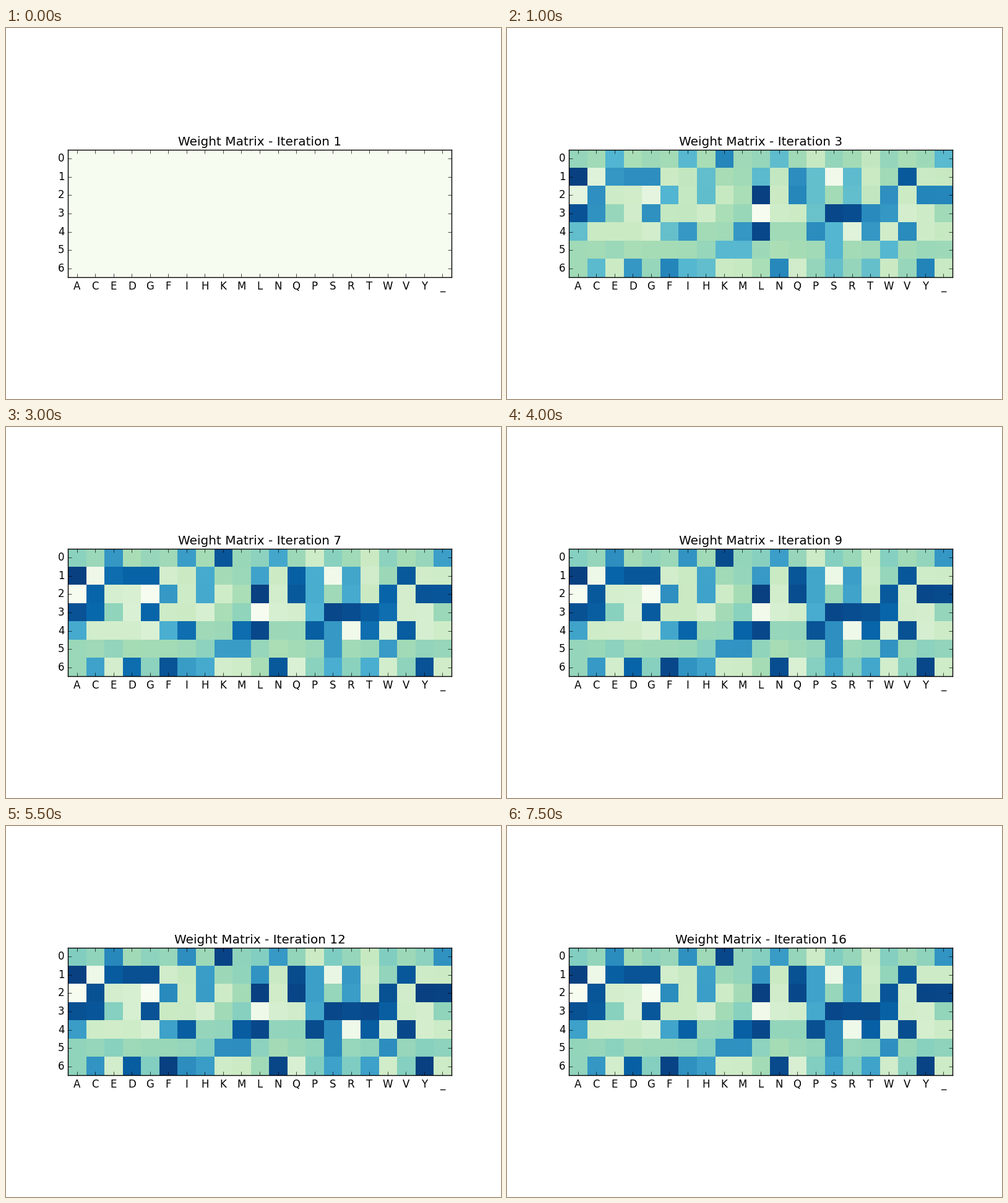
A matplotlib script for the animation above (8 s loop, 800 by 600 pixels).

```python
import numpy as np
import matplotlib.pyplot as plt
from matplotlib.animation import FuncAnimation

plt.style.use("classic")
plt.rcParams["font.family"] = "DejaVu Sans"

LETTERS = "ACEDGFIHKMLNQPSRTWVY_"
ITERATIONS = 16
SETTLE = 13    # iteration at which the weights stop drifting
RATE = 3.7     # time constant of the learning curve

# Letters that stand out at each position; all others stay near NEUTRAL.
NEUTRAL = 0.42
LEVELS = {"strong": 0.91, "raised": 0.68, "faint": 0.21, "lost": 0.03}
PROFILE = [
    dict(strong="K", raised="EIN_", faint="PT"),
    dict(strong="AEDGQV", raised="HLPR", faint="FINTY_", lost="CS"),
    dict(strong="CLQWY_", raised="FHPR", faint="EDIKNTV", lost="AG"),
    dict(strong="ACGSRTW", raised="P", faint="DFIHNQVY", lost="L"),
    dict(strong="IMLPTV", raised="AFS", faint="CEDGWY_", lost="R"),
    dict(raised="KMSW"),
    dict(strong="DFNY", raised="CIHST", faint="EKMQW_"),
]
# Letters already learned in the first pass, per position.
QUICK = ["", "ASV", "L", "ALSRV", "L", "", ""]


def settled():
    w = np.full((len(PROFILE), len(LETTERS)), NEUTRAL)
    for row, groups in zip(w, PROFILE):
        for level, letters in groups.items():
            row[[LETTERS.index(c) for c in letters]] = LEVELS[level]
    jitter = np.random.default_rng(4).uniform(-0.05, 0.05, w.shape)
    return np.clip(w + jitter, 0, 1)


def first_pass(late):
    w = 0.18 + 0.52 * late
    for i, letters in enumerate(QUICK):
        cols = [LETTERS.index(c) for c in letters]
        w[i, cols] = late[i, cols]
    return w


LATE = settled()
EARLY = first_pass(LATE)


def learned(n):
    """Share of the way from EARLY to LATE after n iterations."""
    def curve(k):
        return 1 - np.exp(-(k - 2) / RATE)
    relax = 0.02 * max(0, n - SETTLE)
    return min(1, curve(n) / curve(SETTLE)) - relax


def weights(n):
    if n == 1:
        return np.zeros_like(EARLY)
    w = EARLY + (LATE - EARLY) * learned(n)
    return (w - w.min()) / np.ptp(w)


rows, cols = EARLY.shape
pixel = cols / 620    # one screen pixel in cell units

fig, ax = plt.subplots(figsize=(8, 6), dpi=100, facecolor="white")
# The image reaches one pixel past the right edge, under the frame line.
image = ax.imshow(weights(1), cmap="GnBu", vmin=0, vmax=1,
                  interpolation="nearest",
                  extent=(-0.5, cols - 0.5 + pixel, rows - 0.5, -0.5))
ax.set_xlim(-0.5, cols - 0.5)
ax.set_xticks(range(cols), list(LETTERS))
ax.set_yticks(range(rows))
title = ax.set_title("")


def update(i):
    n = i + 1
    image.set_data(weights(n))
    title.set_text(f"Weight Matrix - Iteration {n}")
    return image, title


anim = FuncAnimation(fig, update, frames=ITERATIONS, interval=500,
                     repeat=True, repeat_delay=0)
plt.show()
```
